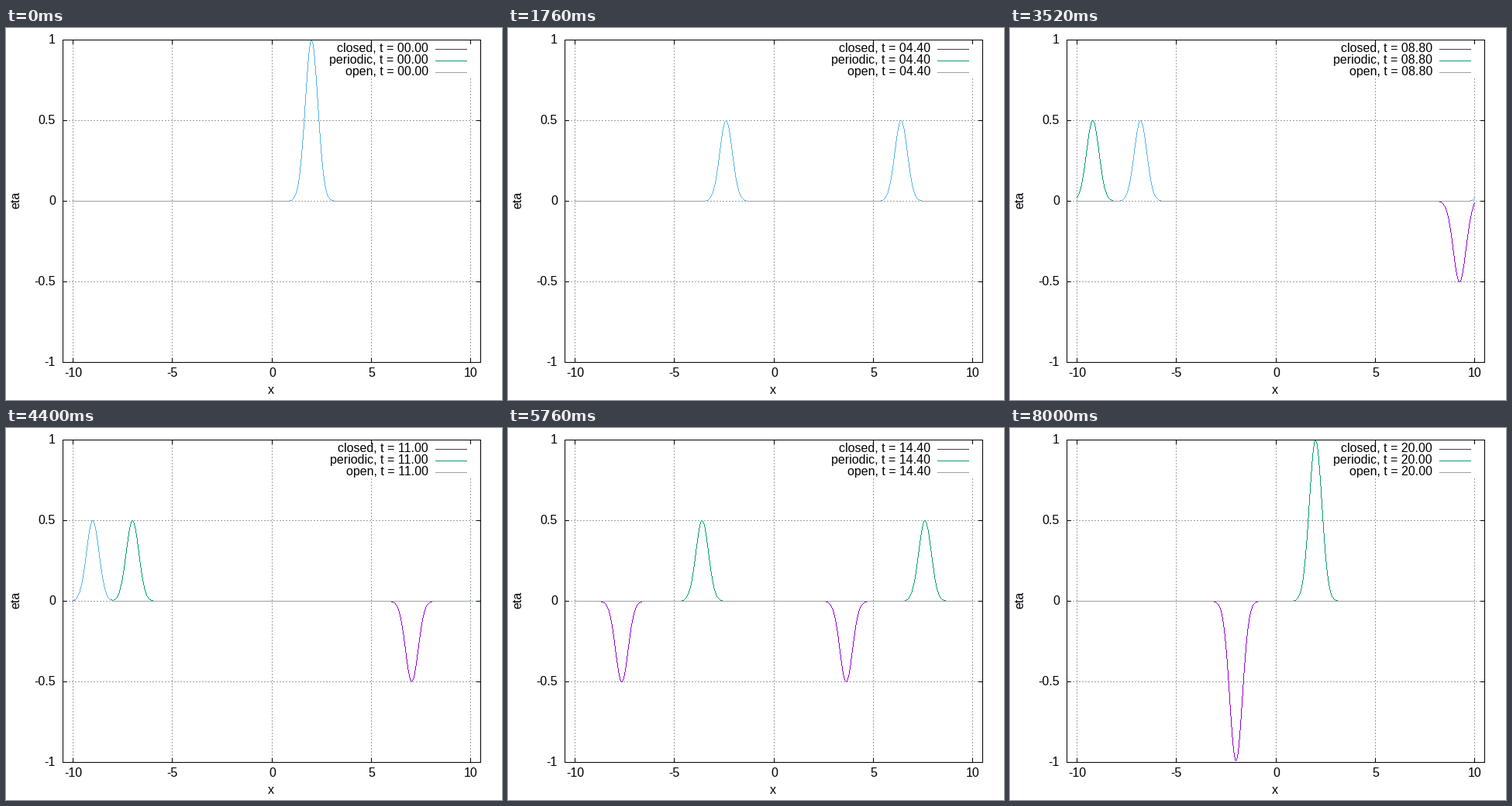
A matplotlib script for the animation above (8.08 s loop, 640 by 480 pixels).

```python
import numpy as np
import matplotlib.pyplot as plt
from matplotlib.animation import FuncAnimation
from matplotlib.patches import Rectangle

plt.rcParams["font.family"] = "Liberation Sans"
plt.rcParams["path.simplify"] = False

W, H, DPI = 640, 480, 100
PX = 72 / DPI                               # one pixel in points
LEFT, RIGHT, TOP, BOTTOM, ZERO = 73, 612, 15, 431, 223
X_TICKS = {-10: 86, -5: 214, 0: 343, 5: 471, 10: 599}
Y_TICKS = {"1": 15, "0.5": 119, "0": 223, "-0.5": 327, "-1": 431}
PURPLE, GREEN, BLUE = "#9400d3", "#009e73", "#56b4e9"
DARK, GREY = "#404040", "#a0a0a0"
FRAMES, STEP = 101, 0.2

fig = plt.figure(figsize=(W / DPI, H / DPI), dpi=DPI, facecolor="white")
ax = fig.add_axes([0, 0, 1, 1])
ax.set_xlim(0, W)
ax.set_ylim(H, 0)
ax.axis("off")


def box(x, y, w, h, color="black"):
    ax.add_patch(Rectangle((x, y), w, h, fc=color, lw=0, snap=False, zorder=5))


def label(x, y, text, ha="center", **kw):
    return ax.text(x, y, text, ha=ha, va="baseline", fontsize=16 * PX,
                   color="black", zorder=6, **kw)


def grid_line(xs, ys):
    ax.plot(xs, ys, color=GREY, lw=PX, ls=(0, (2, 2)), snap=False,
            dash_capstyle="butt", zorder=1)


def curve(color, z):
    return ax.plot([], [], color=color, lw=PX, snap=False,
                   solid_capstyle="butt", zorder=z)[0]


# Grid, ticks and frame; the grid leaves room for the key
for value, x in X_TICKS.items():
    top = 64 if value >= 5 else TOP
    grid_line([x + 0.5] * 2, [BOTTOM, top])
    box(x, TOP, 1, 6)
    box(x, BOTTOM - 5, 1, 6)
    label(x + 0.8, 450, str(value))
for text, y in Y_TICKS.items():
    if TOP < y < BOTTOM:
        grid_line([LEFT, RIGHT], [y + 0.5] * 2)
    box(LEFT, y, 6, 1)
    box(RIGHT - 5, y, 6, 1)
    label(64, y + 5, text, "right")
for y in (TOP, BOTTOM):
    box(LEFT, y, RIGHT - LEFT + 1, 1)
for x in (LEFT, RIGHT):
    box(x, TOP, 1, BOTTOM - TOP + 1)
label(342, 472, "x")
label(17, 222, "eta", rotation=90, rotation_mode="anchor")

# Key
names = ("closed", "periodic", "open")
key = []
for i, (name, color) in enumerate(zip(names, (DARK, GREEN, GREY))):
    key.append(label(545, 31 + 15 * i, "", "right"))
    box(554, 27 + 15 * i, 41, 1, color)

closed, periodic = curve(PURPLE, 2), curve(GREEN, 3)
opened, flat = curve(BLUE, 4), curve(GREY, 4.1)

cols = np.arange(X_TICKS[-10], X_TICKS[10] + 1)
xs = (cols - LEFT) * 21 / (RIGHT - LEFT) - 10.5
START, SPAN, LAG = 2, 20, 0.04              # the walls sit half a cell outside


def pulse(center):
    return 0.5 * np.exp(-5 * (xs - center) ** 2)


def waves(t):
    r, l = START + t, START - t
    out = pulse(r) + pulse(l)
    shut = out - pulse(SPAN + LAG - r) - pulse(-SPAN - LAG - l)
    ring = sum(pulse(c + k * SPAN) for c in (r, l) for k in (-1, 0, 1))
    return shut, ring, out


def rows(eta):
    return (ZERO - np.floor(208 * eta + 0.5)).astype(int)


def runs(y, keep=slice(None)):
    """One vertical pixel run per column, joined halfway to its neighbours."""
    d = np.diff(y)
    ahead = np.append(np.sign(d) * (abs(d) // 2), 0)
    behind = np.append(0, -np.sign(d) * (np.maximum(abs(d) - 1, 0) // 2))
    lo = y + np.minimum(0, np.minimum(ahead, behind))
    hi = y + np.maximum(0, np.maximum(ahead, behind)) + 1
    x = cols + 0.5
    gap = np.full(len(y), np.nan)
    return (np.column_stack([x, x, gap])[keep].ravel(),
            np.column_stack([lo, hi, gap])[keep].ravel())


def draw(n):
    t = n * STEP
    for text, name in zip(key, names):
        text.set_text(f"{name}, t = {t:05.2f}")
    shut, ring, out = map(rows, waves(t))
    closed.set_data(*runs(shut))
    periodic.set_data(*runs(ring))
    opened.set_data(*runs(out, out != ZERO))
    flat.set_data(*runs(out, out == ZERO))
    return closed, periodic, opened, flat, *key


anim = FuncAnimation(fig, draw, frames=FRAMES, interval=80, repeat=True)
plt.show()
```
